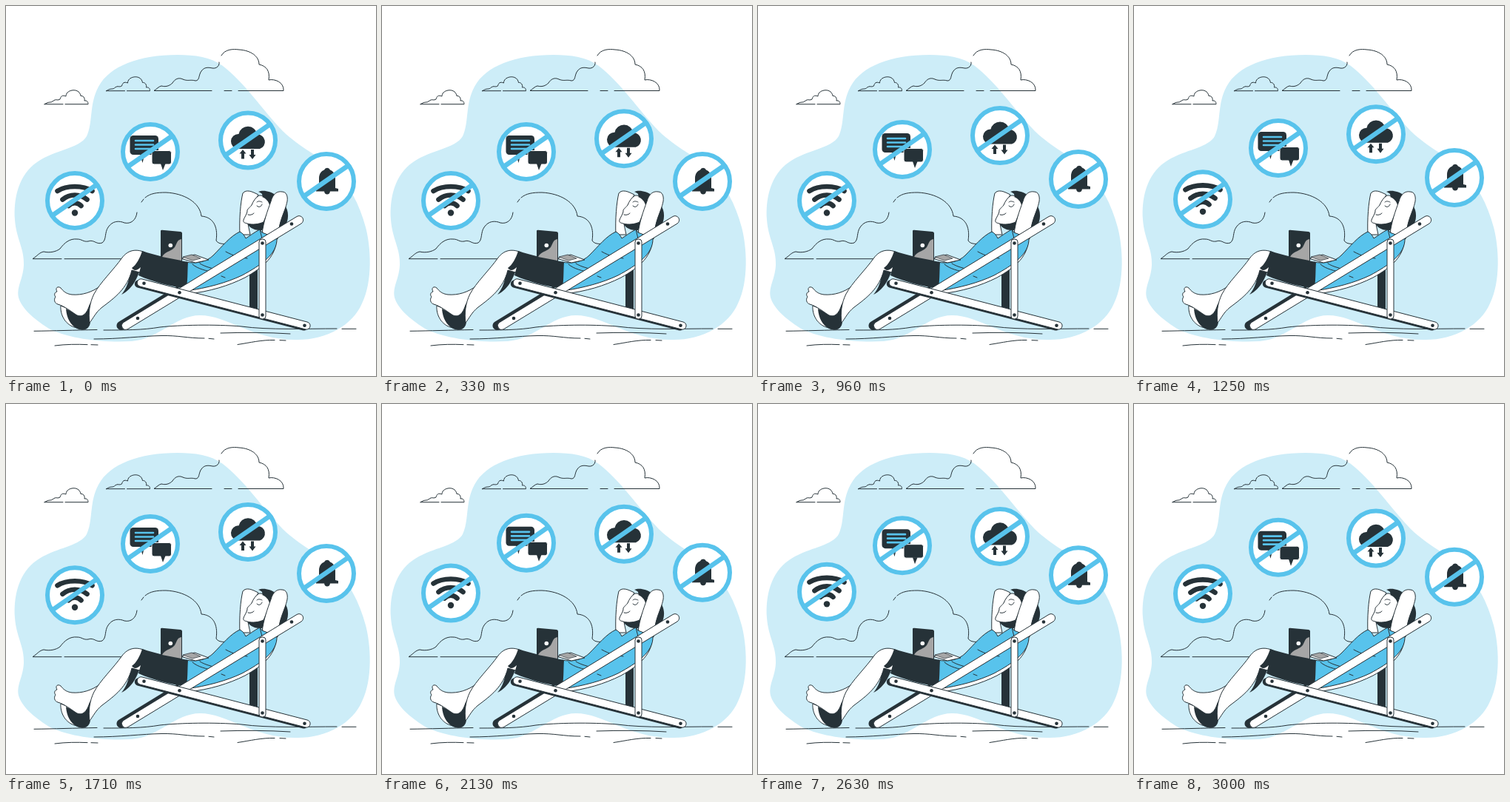
An HTML page for the animation above (3.04 s loop, 500 by 500 pixels).

```html
<!DOCTYPE html>
<html lang="en">
<head>
<meta charset="utf-8">
<title>Offline break</title>
<style>
  html, body { margin: 0; width: 100%; height: 100%; overflow: hidden; background: #fff; }
  svg { display: block; width: 100vw; height: 100vh; }
  .line { fill: none; stroke: #263238; stroke-width: 1; stroke-linecap: round; stroke-linejoin: round; }
  .skin, .wood { fill: #fff; stroke: #263238; stroke-width: 1; stroke-linejoin: round; }
  .dark { fill: #263238; }
  .cloth { fill: #58c3ec; stroke: #263238; stroke-width: 1; stroke-linejoin: round; }
  .arc { fill: none; stroke: #263238; stroke-width: 6.6; stroke-linecap: round; }
  .stripe { fill: none; stroke: #58c3ec; stroke-width: 2.6; stroke-linecap: round; }
</style>
</head>
<body>
<svg viewBox="0 0 500 500">
  <defs>
    <circle id="ring" r="37" fill="#fff" stroke="#58c3ec" stroke-width="6"/>
    <path id="slash" d="M-31 20.500L31-22.500" stroke="#58c3ec" stroke-width="6.4"/>
    <path id="puff" class="line" d="M52 132.700H77M80 132.700H111C111 129 109 127.500 106 128C107 124 104 121 101 121.500C100 115 94 113 89 114C84 115 81 118 81 122C76 120 74 122 73 126C70 128 68 126 66 127C63 128 63 130 60 130C57 130 55 131 52 132.700"/>
    <path id="beam" d="M184 369L407 427A5 5 0 0 1 405 437L181 379A5 5 0 0 1 184 369Z"/>
  </defs>

  <path fill="#cdedf8" d="M232 66C180 66 140 81 125 109C112 133 118 157 109 176C99 193 66 194 42 211C17 228 10 260 12 289C14 315 25 328 24 350C23 370 14 379 17 394C22 411 42 426 60 437C90 451 135 455 170 453C207 450 229 418 262 418C300 418 332 451 391 451C432 452 468 432 481 402C496 372 493 325 486 299C478 269 464 241 442 220C421 201 398 192 374 169C346 140 323 104 293 81C277 69 255 66 232 66Z"/>

  <!-- sky -->
  <use href="#puff"/>
  <use href="#puff" transform="translate(83.500 -18)"/>
  <path class="line" d="M278 114.500H200C204 112 206 109 210 108C217 110 222 107 225 104C228 99 233 96 239 99C246 102 249 99 256 101C262 101 260 93 264 88C268 82 274 83 279 84C285 85 289 80 288 76M291 67C296 58 307 58 315 59C331 60 342 68 342 79C352 81 357 88 355 100C363 98 376 103 375 114.500H314M295 114.500H305"/>
  <path class="line" d="M75 341.700H36C42 338 45 333 51 332C59 334 68 332 73 328C79 320 86 314 96 315C103 315 104 319 111 318C119 315 122 323 130 320C136 316 133 306 138 299C144 290 153 290 160 293C169 295 176 289 177 279M183 265L186 261M188 259C195 253 204 252 216 252C240 253 262 265 264 284C279 285 287 297 284 317C288 323 295 321 309 322M79 341.700H250"/>

  <!-- ground -->
  <path class="line" d="M38 439.300C65 439 92 438 123 437.500M132 438C160 438 185 438 208 434C235 431 282 430 318 433C355 438 406 436 447 436M454 436.300H473M119 450C153 450 184 446 210 445.500C233 445 245 449 268 449M274 449.300L281 450M290 442C320 441 354 441 384 443M66 459C81 457 96 457 110 457.600M115 457.700L124 458M313 457.500C330 455 345 451 363 451.500M370 451.600L378 452"/>

  <!-- feet and legs -->
  <path class="skin" d="M74 405C73 417 80 432 96 435L101 416Z"/>
  <path class="dark" d="M81 409C82 422 87 431 96 436C105 440 113 437 114 427L115 400L101 419Z"/>
  <path class="skin" d="M128 378C116 387 103 391 89 390C81 389 77 385 74 381C70 378 66 381 69 386C65 387 65 391 67 393C64 397 66 402 70 403C80 406 88 413 96 418C104 421 109 416 113 404Z"/>
  <path class="dark" d="M182 354C178 366 172 382 156 390C163 382 167 370 168 356Z"/>
  <path class="skin" d="M188 333C174 327 164 331 157 340C145 357 127 374 119 389C113 401 111 415 113 428C118 422 121 414 130 407C146 395 164 382 170 357L184 361Z"/>

  <!-- back frame -->
  <path class="dark" d="M329 362L340 355V411L329 407ZM250 367L152 427C147 431 150 438 156 438L164 437Z"/>
  <path class="skin" d="M365 312C367 337 348 353 323 367C301 378 275 386 246 389L248 384L350 320Z"/>

  <!-- head and arms -->
  <path class="dark" d="M346 254L370 264C380 268 383 281 380 291C377 299 370 301 366 300L345 303C335 304 327 298 325 292L350 280Z"/>
  <path class="skin" d="M316 309C315 288 317 265 320 253C325 247 333 251 341 255L333 268L326 290L330 309Z"/>
  <path class="skin" d="M342 256C337 259 334 264 332 269C329 273 325 275 326 278C325 282 322 286 321 289C320 293 323 293 326 294C333 296 341 295 348 292L360 264C355 258 348 256 342 256Z"/>
  <path class="dark" d="M341 251C348 248 358 251 364 255L356 269C355 264 351 260 346 258C349 256 346 253 341 251Z"/>
  <path class="line" d="M327 282C330 283 333 282 335 280M339 270C342 273 345 271 346 268M339 265C341 263 344 264 346 265"/>
  <path class="skin" d="M346 308C348 291 353 278 358 264C361 253 367 250 373 251C379 251 381 257 380 264C377 279 369 288 367 315Z"/>

  <!-- clothes -->
  <path class="cloth" d="M243 346C258 349 272 345 280 337C293 324 303 311 316 305C320 307 322 310 324 314C329 311 335 306 343 302L346 306L366 314C367 335 345 350 319 364C298 374 272 381 244 385Z"/>
  <path class="dark" d="M184 331C202 337 224 342 246 346C245 359 246 374 243 382C221 378 198 373 179 364L182 353C176 359 172 357 170 354C176 350 181 341 184 331Z"/>
  <path class="line" d="M252 349C260 356 270 357 282 361M262 348C270 353 278 354 287 357M297 332C308 338 316 340 326 341M291 365L296 367M343 302L346 314"/>

  <!-- laptop -->
  <path class="skin" d="M236 341L255 336L274 343L256 347Z"/>
  <path fill="#a6a6a6" stroke="#263238" stroke-width=".7" d="M239 339L251 336L263 341L252 344Z"/>
  <path class="dark" d="M209 304Q209 302.500 211 302.700L236 305Q238 305.300 238 307V345L211 341Q209 340 209 338Z"/>
  <path fill="#a6a6a6" d="M237 315C230 316 231 323 227 327C222 332 214 332 211 339L237 344Z"/>
  <circle cx="222.300" cy="323.500" r="2.800" fill="#fff"/>

  <!-- front frame -->
  <path class="wood" d="M158 428L393 284.500A5.500 5.500 0 0 1 399 294L164 437A5.500 5.500 0 0 1 158 428Z"/>
  <use href="#beam" class="dark" transform="translate(-3.500 1.500)"/>
  <use href="#beam" class="wood"/>
  <rect class="wood" x="342" y="315" width="9" height="108" rx="4"/>
  <g id="screws" class="dark"></g>

  <!-- floating badges -->
  <g data-x="93" data-y="263" data-delay="1000">
    <path class="arc" d="M-23.500-13C-11-21 11-21 23.500-13M-16.500-1.500C-7-9.500 7-9.500 16.500-1.500M-8.500 7C-4 2 4 2 8.500 7"/>
    <circle class="dark" cy="16.500" r="4.200"/>
  </g>
  <g data-x="195" data-y="197" data-delay="500">
    <rect class="dark" x="-27.500" y="-22" width="38.500" height="26" rx="4.500"/>
    <path class="dark" d="M-14 3L-10.500 15L-7.500 3Z"/>
    <path class="stripe" d="M-20-15H4M-20-9.500H4M-20-4H4"/>
    <rect class="dark" x="2" y="-1.500" width="26.500" height="18.500" rx="3" stroke="#fff" stroke-width="1"/>
    <path class="dark" d="M14 16L17 25L20.500 16Z"/>
  </g>
  <g data-x="327" data-y="181.500" data-delay="0">
    <path class="dark" d="M-13.500 11.500A10 10 0 0 1-12.500-8.500A12.700 12.700 0 0 1 12.500-8A10 10 0 0 1 16 11.500Z"/>
    <path class="dark" d="M-7 12.500L-2.500 18H-5V25H-9V18H-11.500ZM6 25.500L1.500 19.500H4V12.500H8V19.500H10.500Z"/>
  </g>
  <g data-x="433" data-y="237" data-delay="500">
    <path class="dark" d="M-3-15.500A4.300 4.300 0 0 1 5-15.500C9-14 12-10 12-4V9L16 10V13.500H-14V10L-10 9V-4C-10-10-7-14-3-15.500ZM-3 13H5C5 19-3 19-3 13Z"/>
  </g>
</svg>
<script>
  const LOOP = 3040, PERIOD = 3000, RISE = 10, FRAME = 1000 / 24;
  const svgNode = (tag, attrs, parent) => {
    const el = document.createElementNS("http://www.w3.org/2000/svg", tag);
    for (const key in attrs) el.setAttribute(key, attrs[key]);
    return parent.appendChild(el);
  };

  const screws = document.getElementById("screws");
  [[386, 294.5], [346.5, 320.5], [186.5, 374.7], [234.5, 387.3], [178, 422], [346.5, 417.5], [403.5, 431.7]]
    .forEach(([cx, cy]) => svgNode("circle", { cx, cy, r: 2.3 }, screws));

  const badges = [...document.querySelectorAll("[data-delay]")];
  for (const badge of badges) {
    badge.prepend(svgNode("use", { href: "#ring" }, badge));
    svgNode("use", { href: "#slash" }, badge);
  }

  function draw(time) {
    const now = Math.floor((time % LOOP + 5) / FRAME) * FRAME;
    for (const badge of badges) {
      const { x, y, delay } = badge.dataset;
      const phase = Math.max(0, now - delay) / PERIOD % 1;
      const lift = RISE * (1 - Math.abs(1 - 2 * phase));
      badge.setAttribute("transform", `translate(${x} ${y - lift})`);
    }
  }

  const start = performance.now();
  function tick() {
    draw(performance.now() - start);
    requestAnimationFrame(tick);
  }
  tick();
</script>
</body>
</html>
```
